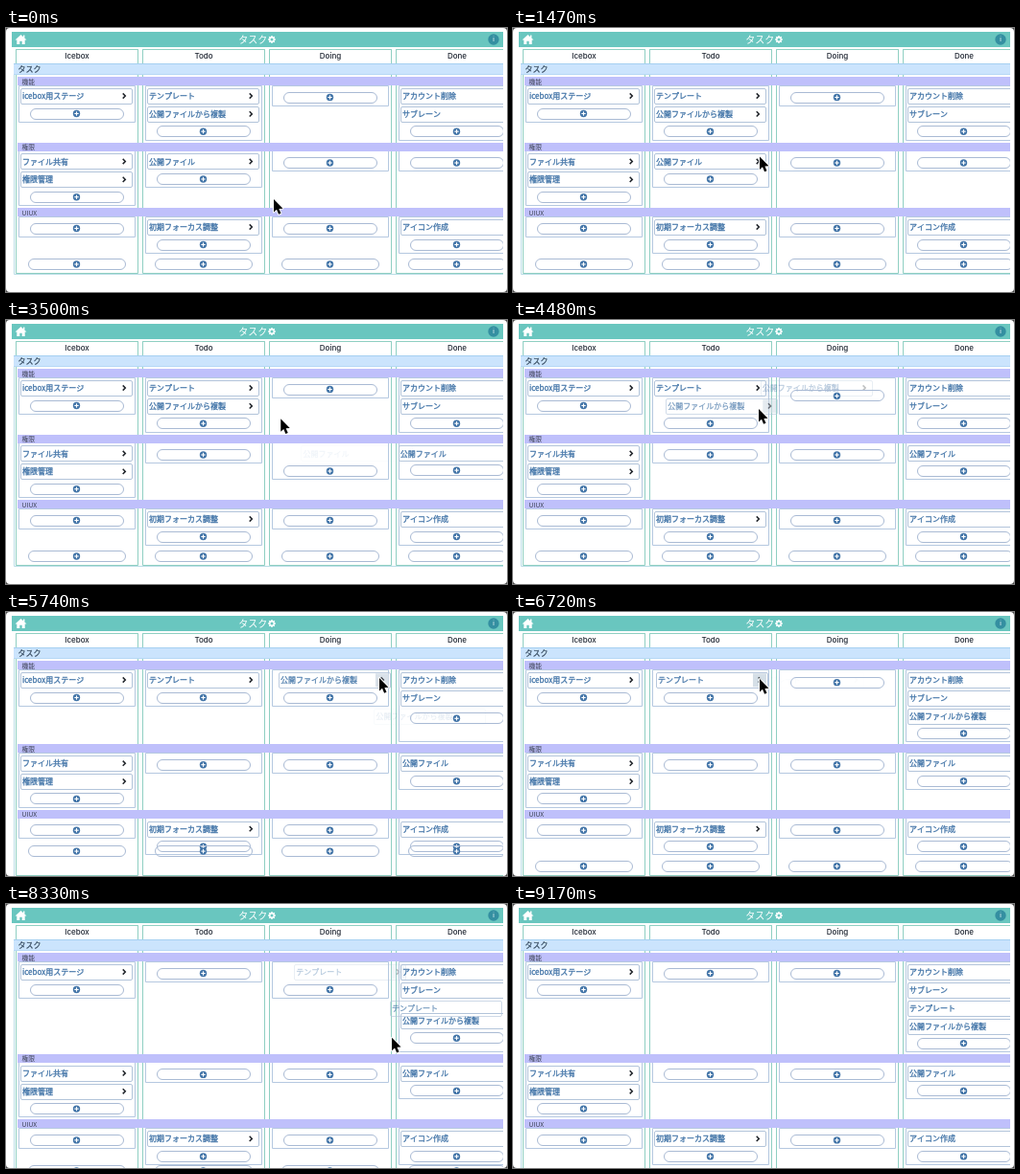
These frames come from a looping animation (522 px wide and 276 px high, 9.24 s). An HTML page with a canvas:

```html
<!DOCTYPE html>
<html lang="ja">
<head>
<meta charset="utf-8">
<title>タスク</title>
<style>
html, body { margin: 0; width: 100%; height: 100%; overflow: hidden; background: #fff; }
canvas { display: block; width: 522px; height: 276px; }
</style>
</head>
<body>
<canvas id="board"></canvas>
<script>
const W = 522, H = 276, LOOP = 9240, STEP = 70, SLIDE = 1000, LAG = 50, SHIFT = 30;
const JP = '"Noto Sans CJK JP", "Noto Sans CJK", sans-serif';
const LATIN = 'Inter, "Liberation Sans", sans-serif';
const BLUE = '#4375a8', GREEN = '#8fcfc2', PALE = '#b5c8e0', TEAL = '#69c6bf';
const stages = ['Icebox', 'Todo', 'Doing', 'Done'];
const lanes = ['機能', '権限', 'UIUX'];

// Each clicked chevron advances a card by one stage.
const card = (text, lane, stage, ...clicks) => ({ text, lane, stage, clicks });
const cards = [
  card('icebox用ステージ', 0, 0),
  card('アカウント削除', 0, 3),
  card('サブレーン', 0, 3),
  card('テンプレート', 0, 1, 6640, 7910),
  card('公開ファイルから複製', 0, 1, 4230, 5600),
  card('ファイル共有', 1, 0),
  card('権限管理', 1, 0),
  card('公開ファイル', 1, 1, 1540, 2780),
  card('初期フォーカス調整', 2, 1),
  card('アイコン作成', 2, 3)
];
const moves = cards.flatMap(c => c.clicks.map((at, i) =>
  ({ at, lane: c.lane, stage: c.stage + i + 1 })));

// time, x, y of the pointer tip
const path = [
  [0, 279, 179], [350, 279, 179], [1330, 257, 134.5], [1680, 257, 134.5],
  [2520, 390, 138.5], [2870, 390, 138.5], [3780, 256, 93], [4620, 256, 93],
  [5420, 389, 69], [5810, 389, 69], [6500, 257, 70], [6790, 257, 70],
  [7560, 390, 71], [8050, 390, 71], [8820, 430, 300], [LOOP, 430, 300]
];

const canvas = document.getElementById('board');
const dpr = window.devicePixelRatio || 1;
canvas.width = W * dpr;
canvas.height = H * dpr;
const g = canvas.getContext('2d');

const clamp = v => Math.max(0, Math.min(1, v));

// cubic-bezier(.25, .1, .25, 1)
function ease(x) {
  x = clamp(x);
  if (x === 0 || x === 1) return x;
  const curve = (s, a, b) => 3 * (1 - s) ** 2 * s * a + 3 * (1 - s) * s * s * b + s ** 3;
  let lo = 0, hi = 1;
  for (let i = 0; i < 20; i++) {
    const mid = (lo + hi) / 2;
    if (curve(mid, 0.25, 0.25) < x) lo = mid; else hi = mid;
  }
  return curve(lo, 0.1, 1);
}

// A leaving card keeps its room until its slide ends.
function inCell(c, stage, t) {
  const i = stage - c.stage;
  if (i < 0 || i > c.clicks.length) return false;
  const from = i ? c.clicks[i - 1] : -1;
  const to = i < c.clicks.length ? c.clicks[i] + SLIDE : Infinity;
  return t >= from && t < to;
}
const cell = (lane, stage, t) => cards.filter(c => c.lane === lane && inCell(c, stage, t));

const laneHeight = (lane, t) =>
  31.1 + 18.7 * Math.max(...stages.map((_, s) => cell(lane, s, t).length));

function laneY(lane, t) {
  let y = 55.5;
  for (let i = 0; i < lane; i++) y += laneHeight(i, t);
  return y;
}
const stackY = t => laneY(2, t) + 54.5;

// Button offset below a lane's band; an empty cell keeps a little padding.
const buttonOffset = count => 15.3 + 18.7 * count + (count ? 0 : 1.7);

// Glides from the value before a click to the value after it.
function glide(value, t, applies) {
  let v = value(t);
  for (const m of moves) {
    if (t < m.at || t >= m.at + SLIDE || !applies(m)) continue;
    v += (value(m.at - 1) - value(m.at)) * (1 - ease((t - m.at) / SLIDE));
  }
  return v;
}

// A thin outline gives the small letters a medium weight.
function text(str, x, y, font, color, align = 'left', weight = 0) {
  g.font = font;
  g.fillStyle = g.strokeStyle = color;
  g.textAlign = align;
  g.textBaseline = 'middle';
  g.fillText(str, x, y);
  if (!weight) return;
  g.lineWidth = weight;
  g.strokeText(str, x, y);
}

function fill(color, x, y, w, h) {
  g.fillStyle = color;
  g.fillRect(x, y, w, h);
}

function box(x, y, w, h, color, r = 0) {
  g.strokeStyle = color;
  g.lineWidth = 1;
  g.beginPath();
  g.roundRect(Math.round(x) + 0.5, Math.round(y) + 0.5, Math.round(w) - 1, Math.round(h) - 1, r);
  g.stroke();
}

function line(points, color, width) {
  g.strokeStyle = color;
  g.lineWidth = width;
  g.beginPath();
  points.forEach(([x, y]) => g.lineTo(x, y));
  g.stroke();
}

function disc(x, y, r, color) {
  g.fillStyle = color;
  g.beginPath();
  g.arc(x, y, r, 0, Math.PI * 2);
  g.fill();
}

function addButton(cx, y, w) {
  box(cx - w / 2, y - 6, w, 12, '#a9bad4', 5.5);
  disc(cx, y, 3.7, BLUE);
  line([[cx - 2.2, y], [cx + 2.2, y]], '#fff', 1.1);
  line([[cx, y - 2.2], [cx, y + 2.2]], '#fff', 1.1);
}

function drawCard(c, stage, left, y, t) {
  const i = stage - c.stage;
  let x = left + 5, alpha = 1, pressed = false;
  if (i > 0) {
    const p = ease((t - c.clicks[i - 1] - LAG) / SLIDE);
    x -= SHIFT * (1 - p);
    alpha = p;
  }
  if (i < c.clicks.length && t >= c.clicks[i]) {
    const p = ease((t - c.clicks[i]) / SLIDE);
    x += SHIFT * p;
    alpha *= 1 - p;
    pressed = true;
  }
  g.globalAlpha = alpha;
  box(x, y - 8.5, 117, 17, '#b2c4da', 1.5);
  if (pressed) fill('#d3dde6', x + 101, y - 7, 14, 14);
  text(c.text, x + 2, y - 0.3, '500 8px ' + JP, BLUE, 'left', 0.3);
  if (stage < stages.length - 1) {
    const cx = x + 108;
    line([[cx - 1.3, y - 2.9], [cx + 1.3, y - 0.3], [cx - 1.3, y + 2.3]], '#20242a', 1.5);
  }
  g.globalAlpha = 1;
}

function drawCell(lane, stage, t) {
  const left = 10 + 132 * stage, top = laneY(lane, t);
  const list = cell(lane, stage, t);
  const here = m => m.lane === lane && m.stage === stage;
  box(left + 3, top + 4, 122, buttonOffset(list.length) + 5, PALE);
  for (const c of list) {
    const index = glide(time => {
      const n = cell(lane, stage, time).indexOf(c);
      return n < 0 ? list.indexOf(c) : n;
    }, t, here);
    drawCard(c, stage, left, top + 15.8 + 18.9 * index, t);
  }
  const offset = glide(time => buttonOffset(cell(lane, stage, time).length), t, here);
  addButton(left + 63.5, top + offset, 98);
}

function drawHeader() {
  fill(TEAL, 6, 4, 512, 16);
  g.fillStyle = '#fff';
  g.beginPath();
  [[9.5, 12.5], [15.5, 7], [18, 9.2], [18, 7.5], [19.4, 7.5], [19.4, 10.5], [21.5, 12.5],
   [19.7, 12.5], [19.7, 17], [16.7, 17], [16.7, 13.7], [14.3, 13.7], [14.3, 17],
   [11.3, 17], [11.3, 12.5]].forEach(([x, y]) => g.lineTo(x, y));
  g.fill();
  text('タスク', 242.3, 11.8, '500 10px ' + JP, '#fff');
  for (let i = 0; i < 4; i++) {
    const a = i * Math.PI / 4, dx = Math.cos(a) * 3.9, dy = Math.sin(a) * 3.9;
    line([[277 - dx, 12 - dy], [277 + dx, 12 + dy]], '#fff', 1.4);
  }
  disc(277, 12, 2.9, '#fff');
  disc(277, 12, 1.5, TEAL);
  disc(508, 12, 5.7, '#348fa1');
  text('i', 508, 12.2, '600 6px ' + LATIN, '#d8eef0', 'center');
}

function drawPointer(t) {
  const i = Math.max(1, path.findIndex(k => k[0] > t));
  const [t0, x0, y0] = path[i - 1], [t1, x1, y1] = path[i];
  const u = clamp((t - t0) / (t1 - t0)), p = u * u * (3 - 2 * u);
  g.save();
  g.translate(x0 + (x1 - x0) * p, y0 + (y1 - y0) * p);
  g.beginPath();
  [[0, 0], [0, 13.5], [3, 10.8], [5.1, 15.8], [7.5, 14.8], [5.4, 9.9], [9.5, 9.7]]
    .forEach(([x, y]) => g.lineTo(x, y));
  g.closePath();
  g.lineJoin = 'round';
  g.strokeStyle = '#fff';
  g.lineWidth = 1.8;
  g.stroke();
  g.fillStyle = '#000';
  g.fill();
  g.restore();
}

function drawWindow() {
  fill('#4a4a4a', 0, 0, W, H);
  g.fillStyle = '#fff';
  g.beginPath();
  g.roundRect(0, 0, W, H, 4);
  g.fill();
}

function draw(t) {
  g.setTransform(dpr, 0, 0, dpr, 0, 0);
  drawWindow();
  g.save();
  g.beginPath();
  g.rect(0, 0, 518, H);
  g.clip();
  drawHeader();
  const end = stackY(t) + 10;
  box(8, 37, 540, end - 36, '#b9dde6');
  stages.forEach((name, s) => {
    const left = 10 + 132 * s;
    box(left, 22, 128, end - 22, GREEN);
    box(left, 22, 128, 16, GREEN);
    text(name, left + 64, 29.8, '500 8px ' + LATIN, '#1d2430', 'center');
  });
  fill('#cbe4fd', 8, 37, 510, 11);
  fill('#a5d0f1', 8, 37, 510, 1);
  fill('#b6d8f5', 8, 48, 510, 1);
  text('タスク', 12.5, 42.8, '500 8px ' + JP, '#34485c', 'left', 0.2);
  lanes.forEach((name, lane) => {
    const y = laneY(lane, t);
    stages.forEach((_, s) => drawCell(lane, s, t));
    fill('#bfc0fb', 12, Math.round(y - 4.5), 506, 9);
    text(name, 16.5, y + 0.5, '500 6.8px ' + JP, '#3c4254');
  });
  const y = glide(stackY, t, () => true);
  stages.forEach((_, s) => addButton(73.5 + 132 * s, y, 102));
  g.restore();
  drawPointer(t);
}

function tick() {
  const t = performance.now() % LOOP;
  draw(Math.floor(t / STEP) * STEP);
  requestAnimationFrame(tick);
}
tick();
</script>
</body>
</html>
```
